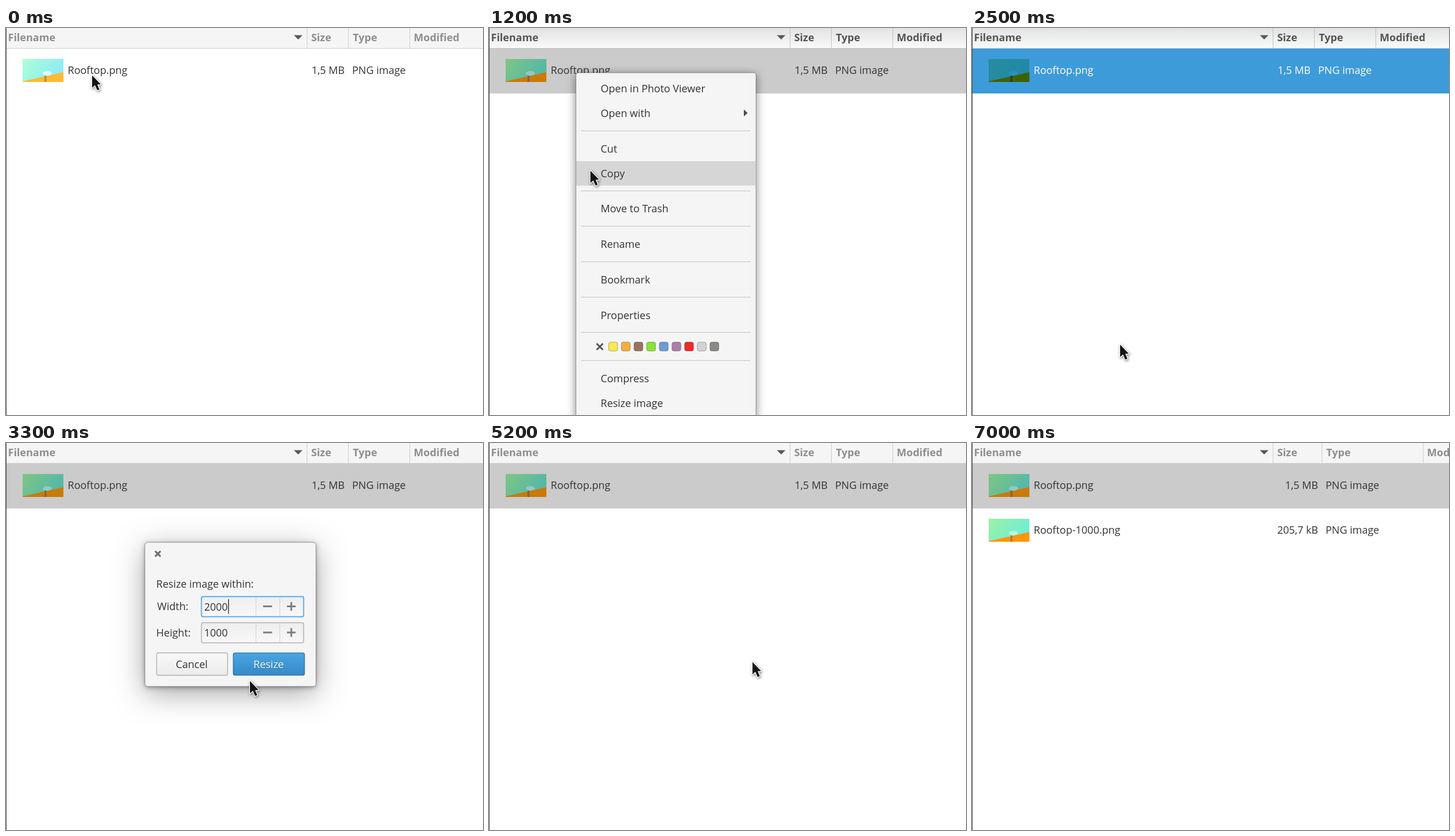
These frames come from a looping animation (831 by 674 pixels, 8.6 s). An HTML page with a canvas:

```html
<!DOCTYPE html>
<html lang="en">
<head>
<meta charset="utf-8">
<title>Resize an image from the file manager</title>
<style>
  html, body { margin: 0; width: 100%; height: 100%; overflow: hidden; background: #fff; }
  canvas { display: block; }
</style>
</head>
<body>
<canvas id="stage" width="831" height="674"></canvas>
<script>
const ctx = document.getElementById('stage').getContext('2d');
const LOOP = 8600, STEP = 100;
const FONT = '18px "Open Sans", sans-serif';

// Thumbnail colours: sky start, sky end, roof, cloud, chimney
const THUMBS = {
  fresh: ['#aaffd6', '#8ceaf8', '#ffbb30', '#d9fbff', '#b88a4e'],
  gray:  ['#7dc584', '#52b7ab', '#cc7906', '#93c9bf', '#86643f'],
  blue:  ['#268d9c', '#2188ac', '#3f6106', '#2f8fc0', '#24432e'],
  small: ['#9bf1a5', '#6eeed8', '#ff960a', '#b5f7ea', '#a87a48']
};
const SWATCHES = ['#fbe850', '#f6ad40', '#97735f', '#8ae234', '#6c9cd3',
                  '#ad7fa8', '#ef2929', '#d3d4cf', '#888a85'];
// Menu labels with the vertical centre of their line
const MENU = [['Open in Photo Viewer', 105.5], ['Open with', 148], ['Cut', 210],
  ['Copy', 253], ['Move to Trash', 314.5], ['Rename', 376.5], ['Bookmark', 438],
  ['Properties', 500], ['Compress', 610], ['Resize image', 653]];
const RULES = [179, 283.5, 345, 407, 468.5, 530, 579];

// Pointer stops: time, x, y
const PATH = [[1000, 150, 81], [1300, 190, 330], [1600, 236, 625], [1800, 247, 648],
  [2300, 247, 648], [2500, 258, 550], [2800, 329, 468], [3000, 329, 468],
  [3300, 425, 413], [3600, 455, 386], [3700, 455, 386], [3800, 459, 380],
  [6100, 459, 380], [7000, 36, -34]];

const between = (t, a, b) => t >= a && t < b;
const mix = (a, b, k) => a + (b - a) * k;
const gray = v => `rgb(${Math.round(v)},${Math.round(v)},${Math.round(v)})`;

// Piecewise linear value over [time, ...values] rows
function follow(rows, t) {
  const next = rows.findIndex(row => row[0] > t);
  if (next === 0) return rows[0].slice(1);
  if (next < 0) return rows[rows.length - 1].slice(1);
  const a = rows[next - 1], b = rows[next];
  return a.slice(1).map((v, i) => mix(v, b[i + 1], (t - a[0]) / (b[0] - a[0])));
}

function rect(x, y, w, h, color) {
  ctx.fillStyle = color;
  ctx.fillRect(x, y, w, h);
}

function text(str, x, y, color, align = 'left', bold = false) {
  ctx.font = (bold ? 'bold ' : '') + FONT;
  ctx.textAlign = align;
  ctx.fillStyle = color;
  ctx.fillText(str, x, y);
}

function polygon(points, color) {
  ctx.beginPath();
  points.forEach(([x, y]) => ctx.lineTo(x, y));
  ctx.closePath();
  ctx.fillStyle = color;
  ctx.fill();
}

function vertical(y0, y1, top, bottom) {
  const g = ctx.createLinearGradient(0, y0, 0, y1);
  g.addColorStop(0, top);
  g.addColorStop(1, bottom);
  return g;
}

function box(x, y, w, h, r, fill, stroke, width = 1) {
  ctx.beginPath();
  ctx.roundRect(x, y, w, h, r);
  ctx.fillStyle = fill;
  ctx.fill();
  if (!stroke) return;
  ctx.strokeStyle = stroke;
  ctx.lineWidth = width;
  ctx.stroke();
}

function shadowed(blur, offset, opacity, draw) {
  ctx.save();
  ctx.shadowColor = `rgba(0,0,0,${opacity})`;
  ctx.shadowBlur = blur;
  ctx.shadowOffsetY = offset;
  draw();
  ctx.restore();
}

// Draws a popup faded and scaled about its centre
function popup(cx, cy, alpha, scale, draw) {
  ctx.save();
  ctx.globalAlpha = alpha;
  ctx.translate(cx, cy);
  ctx.scale(scale, scale);
  ctx.translate(-cx, -cy);
  draw();
  ctx.restore();
}

function cross(x, y, r, color) {
  ctx.beginPath();
  ctx.moveTo(x - r, y - r); ctx.lineTo(x + r, y + r);
  ctx.moveTo(x + r, y - r); ctx.lineTo(x - r, y + r);
  ctx.strokeStyle = color;
  ctx.lineWidth = 3;
  ctx.stroke();
}

function thumbnail(x, y, [skyA, skyB, roof, cloud, chimney]) {
  ctx.save();
  ctx.translate(x, y);
  const sky = ctx.createLinearGradient(5, 0, 55, 40);
  sky.addColorStop(0, skyA);
  sky.addColorStop(1, skyB);
  rect(0, 0, 71, 40, sky);
  ctx.fillStyle = cloud;
  ctx.beginPath();
  ctx.ellipse(43, 25, 8, 4, 0, 0, 7);
  ctx.fill();
  polygon([[0, 39], [71, 23], [71, 40], [0, 40]], roof);
  rect(38, 29, 3.5, 11, chimney);
  ctx.restore();
}

function header(active, cols) {
  const tone = gray(mix(142, 85, active));
  rect(0, 0, 831, 35, vertical(0, 35, gray(mix(245, 226, active)), gray(mix(245, 250, active))));
  rect(0, 35, 831, 1, gray(mix(204, 190, active)));
  for (const x of cols) rect(x, 0, 1, 35, gray(mix(204, 192, active)));
  text('Filename', 3.5, 23, tone, 'left', true);
  ['Size', 'Type', 'Modified'].forEach((name, i) =>
    text(name, cols[i] + [7.7, 8.2, 7.3][i], 23, tone, 'left', true));
  polygon([[501.5, 12.5], [516.5, 12.5], [509, 20]], '#595959');
}

function fileRow(y, name, size, cols, thumb, color) {
  thumbnail(29, y + 18, THUMBS[thumb]);
  text(name, 107.5, y + 44, color);
  text(size, cols[1] - 6, y + 44, color, 'right');
  text('PNG image', cols[1] + 7, y + 44, color);
}

function fileList(t) {
  const done = t >= 6200;
  const cols = done ? [524, 609, 785.5] : [524, 596, 703];
  const [active] = follow([[400, 0], [600, 1], [2500, 1], [2800, 0]], t);
  const state = t < 300 ? 'fresh' : between(t, 2100, 2600) ? 'blue' : 'gray';
  rect(0, 0, 831, 674, '#fff');
  header(active, cols);
  if (state !== 'fresh') rect(0, 36, 831, 78, state === 'blue' ? '#3d9bda' : '#cbcbcb');
  fileRow(36, 'Rooftop.png', '1,5 MB', cols, state, state === 'blue' ? '#fff' : '#333');
  if (done) fileRow(114, 'Rooftop-1000.png', '205,7 kB', cols, 'small', '#333');
  rect(0, 0, 1, 674, '#4c4c4c');
}

function menu(pointerX, pointerY) {
  shadowed(16, 3, .5, () => box(151.5, 78, 313.5, 720, 4, '#f5f5f5', 'rgba(0,0,0,.3)'));
  for (const y of RULES) rect(160, y - .5, 296, 1.3, '#cbcbcb');
  for (const [label, y] of MENU) {
    if (pointerX > 152 && Math.abs(pointerY - y) < 21.5) rect(152, y - 21, 313, 42.5, '#d6d6d6');
    text(label, 194.5, y + 6.5, '#333');
  }
  polygon([[444, 142], [450.5, 148], [444, 154]], '#4a4a4a');
  cross(193, 555, 5.5, '#555');
  SWATCHES.forEach((color, i) =>
    box(208.5 + i * 22.05, 547, 15.5, 15.5, 3.5, color, 'rgba(0,0,0,.3)'));
}

function spinner(y, value, focused) {
  box(340.5, y, 178, 35, 3, vertical(y, y + 35, '#eeeeee', '#f8f8f8'),
    focused ? '#5fabe6' : '#b2b2b2', focused ? 2 : 1.6);
  for (const x of [435, 476.5]) rect(x, y + 1, 1, 33, '#d2d2d2');
  text(value, 345.2, y + 24, '#333');
  const mid = y + 17;
  rect(448, mid - 1.5, 15.5, 3, '#7d7d7d');
  rect(489.5, mid - 1.5, 15, 3, '#7d7d7d');
  rect(495.5, mid - 7.5, 3, 15, '#7d7d7d');
}

function dialog(hover, caret) {
  const panel = () => box(242, 173, 298, 251, 5, '#f5f5f5');
  shadowed(50, 12, .35, panel);
  shadowed(8, 2, .35, panel);
  box(242, 173, 298, 251, 5, '#f5f5f5', 'rgba(0,0,0,.36)');
  cross(264.5, 193, 4.7, '#666');
  text('Resize image within:', 261.8, 252, '#333');
  text('Width:', 263.3, 291, '#333');
  text('Height:', 261.8, 337, '#333');
  spinner(267.5, '2000', true);
  spinner(313, '1000', false);
  if (caret) rect(387, 272, 1.3, 25, '#222');
  box(262.5, 365.5, 123.5, 39, 3, vertical(365, 404, '#f9f9f9', '#ececec'), '#b0b0b0', 1.4);
  text('Cancel', 323.5, 391.5, '#333', 'center');
  const blue = hover ? ['#59b0e9', '#3e94d1'] : ['#4ba5e1', '#358ac8'];
  box(396, 365.5, 124, 39, 3, vertical(365, 404, ...blue), '#23699f', 1.2);
  shadowed(1, 1, .35, () => text('Resize', 457.5, 391.5, '#fff', 'center'));
}

function pointer(x, y) {
  ctx.save();
  ctx.translate(x, y + 1.5);
  ctx.beginPath();
  [[0, 0], [0, 21.5], [5, 17], [9, 26], [12.8, 24.4], [9, 16], [15, 15.6]]
    .forEach(p => ctx.lineTo(...p));
  ctx.closePath();
  ctx.lineJoin = 'round';
  ctx.lineWidth = 2.6;
  ctx.strokeStyle = '#fff';
  ctx.shadowColor = 'rgba(0,0,0,.55)';
  ctx.shadowBlur = 4;
  ctx.shadowOffsetX = 1;
  ctx.shadowOffsetY = 1.5;
  ctx.stroke();
  ctx.shadowColor = 'transparent';
  ctx.fillStyle = '#141414';
  ctx.fill();
  ctx.restore();
}

function draw(t) {
  const [x, y] = follow(PATH, t);
  fileList(t);
  if (between(t, 500, 2200)) {
    const [alpha, scale] = follow([[500, .55, .95], [600, .9, .989], [700, 1, 1],
      [2000, 1, 1], [2100, .45, 1]], t);
    popup(308.3, 438, alpha, scale, () => menu(x, y));
  }
  if (between(t, 2600, 5200)) {
    const [alpha, scale] = follow([[2600, .45, .95], [2700, .85, .985], [2800, 1, 1],
      [4900, 1, 1], [5000, .6, .96], [5100, .2, .92]], t);
    const caret = t < 3400 || between(t, 3800, 4400);
    const hover = between(y, 365, 405) && between(x, 396, 520);
    popup(391, 298.5, alpha, scale, () => dialog(hover, caret));
  }
  pointer(x, y);
}

const start = performance.now();
function tick() {
  const t = (performance.now() - start) % LOOP;
  draw(Math.floor(t / STEP) * STEP);
  requestAnimationFrame(tick);
}
tick();
</script>
</body>
</html>
```
